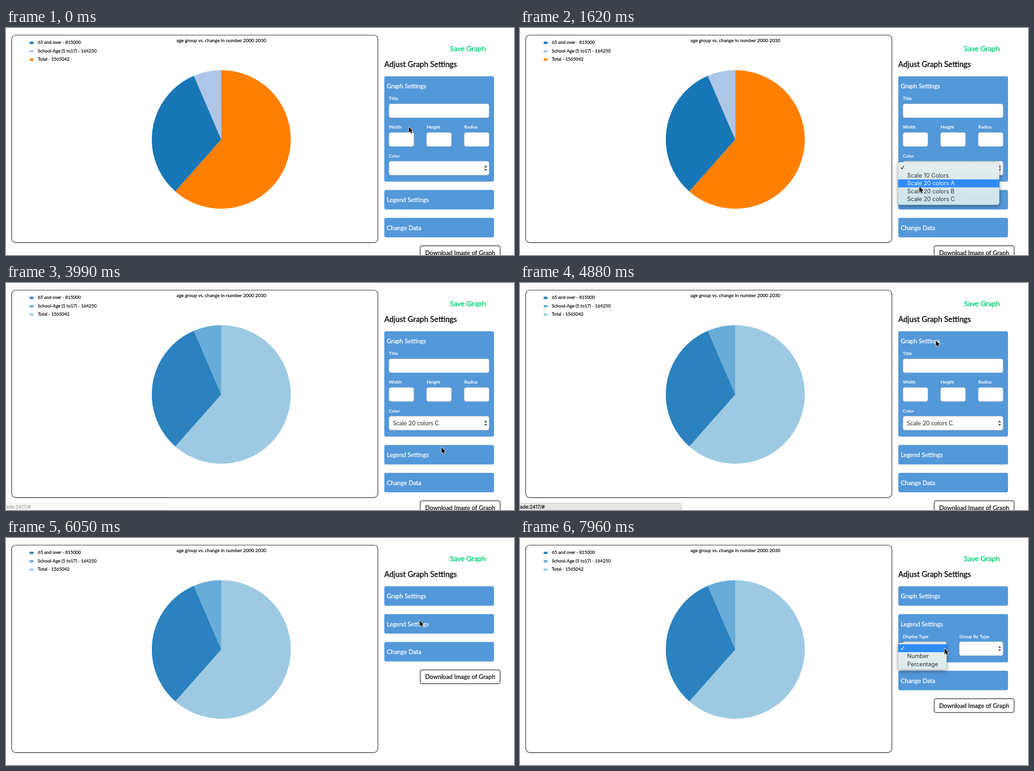
Recreate the animation shown at these times as an HTML page with a canvas. Size 1118 by 501 pixels, loop 8 s.

```html
<!DOCTYPE html>
<html lang="en">
<head>
<meta charset="utf-8">
<title>Graph settings</title>
<style>
html, body { margin: 0; width: 100%; height: 100%; overflow: hidden; background: #fff; }
canvas { display: block; width: 1118px; height: 501px; }
</style>
</head>
<body>
<canvas id="stage"></canvas>
<script>
const W = 1118, H = 501, LOOP = 8000, TICK = 147.4;
const canvas = document.getElementById('stage');
const ctx = canvas.getContext('2d');
const dpr = window.devicePixelRatio || 1;
canvas.width = W * dpr;
canvas.height = H * dpr;

const UI = 'Lato, "Open Sans", sans-serif';
const SYSTEM = 'Inter, Roboto, sans-serif';
const BLUE = '#5398d9';
const HEAD = 43, GAP = 18.5, PANEL_TOP = 106.6;

const DATA = [
  ['65 and over', 815000],
  ['School-Age (5 to17)', 164250],
  ['Total', 1565042]
];
const TOTAL = DATA.reduce((sum, d) => sum + d[1], 0);
const COLORS_A = ['#1776b6', '#aec6e8', '#ff8000'];
const COLORS_C = ['#2b82bf', '#68acd9', '#9dcae2'];
const SCALES = ['', 'Scale 10 Colors', 'Scale 20 colors A', 'Scale 20 colors B', 'Scale 20 colors C'];

// Keyframes: [tick, values...]
const POINTER = [
  [0, 886.5, 218], [3, 871, 316], [6, 871, 316], [11, 879, 350], [12, 879, 357],
  [15, 878.5, 372], [16, 878.5, 372], [17, 878.5, 373.5], [23, 878.5, 373.5],
  [27, 958.5, 363], [32, 915, 127], [35, 915, 126], [36, 927, 143], [37, 927, 146],
  [42, 906, 191], [43, 906, 191], [45, 911.5, 212], [51, 934, 243.5], [54, 934.5, 244]
];
const STATUS = [
  [23, 0], [24, 1], [26, 1], [27, .28], [28, 0], [32, 0], [33, 1], [37, 1], [39, 0],
  [41, 0], [42, 1], [50, 1], [54, 0]
];

function track(keys, k) {
  let i = 0;
  while (i < keys.length - 1 && keys[i + 1][0] <= k) i++;
  const a = keys[i], b = keys[i + 1];
  if (!b || k <= a[0]) return a.slice(1);
  const p = (k - a[0]) / (b[0] - a[0]);
  return a.slice(1).map((v, n) => v + (b[n + 1] - v) * p);
}

// cubic-bezier(.25, .1, .25, 1)
function ease(x) {
  if (x <= 0) return 0;
  if (x >= 1) return 1;
  const curve = (a, b, s) => 3 * a * s * (1 - s) ** 2 + 3 * b * s * s * (1 - s) + s ** 3;
  let lo = 0, hi = 1;
  for (let i = 0; i < 20; i++) {
    const mid = (lo + hi) / 2;
    if (curve(.25, .25, mid) < x) lo = mid; else hi = mid;
  }
  return curve(.1, 1, lo);
}

// A thin outline of the given thickness thickens the regular face.
function text(str, x, y, size, color, { weight = 400, family = UI, align = 'left', bolder = .3 } = {}) {
  ctx.font = `${weight} ${size}px ${family}`;
  ctx.textAlign = align;
  ctx.fillStyle = ctx.strokeStyle = color;
  ctx.lineJoin = 'round';
  ctx.lineWidth = bolder;
  ctx.fillText(str, x, y);
  if (bolder) ctx.strokeText(str, x, y);
}

function box(x, y, w, h, r, fill, stroke, line = 1) {
  ctx.beginPath();
  ctx.roundRect(x, y, w, h, r);
  if (fill) { ctx.fillStyle = fill; ctx.fill(); }
  if (stroke) { ctx.strokeStyle = stroke; ctx.lineWidth = line; ctx.stroke(); }
}

function poly(points, fill) {
  ctx.beginPath();
  points.forEach(([x, y]) => ctx.lineTo(x, y));
  ctx.closePath();
  ctx.fillStyle = fill;
  ctx.fill();
}

function drawGraph(colors) {
  box(12.5, 15.8, 806, 457.8, 9, '#fff', '#111', 1.1);
  text('age group vs. change in number 2000 2030', 474, 30.5, 10.4, '#111', { align: 'center' });
  DATA.forEach(([name, value], i) => {
    const y = 35 + i * 18.5;
    ctx.fillStyle = colors[i];
    ctx.fillRect(52, y - 4.7, 8.5, 5);
    text(`${name} - ${value}`, 70, y, 9.9, '#111');
  });
  let start = -Math.PI / 2;
  [2, 0, 1].forEach(i => {
    const end = start + DATA[i][1] / TOTAL * Math.PI * 2;
    ctx.beginPath();
    ctx.moveTo(473.8, 246);
    ctx.arc(473.8, 246, 153, start, end);
    ctx.closePath();
    ctx.fillStyle = colors[i];
    ctx.fill();
    start = end;
  });
}

function field(x, y, w) {
  box(x, y, w, 30.5, 4, '#fff', '#c4c9ce');
}

function select(x, y, w, value = '') {
  field(x, y, w);
  const ax = x + w - 7.3, ay = y + 15.2;
  for (const dir of [-1, 1]) {
    poly([[ax - 3, ay + dir * 1.6], [ax + 3, ay + dir * 1.6], [ax, ay + dir * 6.2]], '#4c4c4c');
  }
  if (value) text(value, x + 8.5, y + 20, 13.5, '#555');
}

function label(str, x, y) {
  text(str, x, y, 10, '#fff', { weight: 700, bolder: 0 });
}

// Draws a panel clipped to its height; returns the top of the next one.
function panel(title, y, extra, content) {
  const h = HEAD + extra;
  ctx.save();
  box(832.5, y, 241.5, h, 4, BLUE);
  ctx.clip();
  text(title, 838, y + 26.5, 13.4, '#fff');
  if (extra > 0) content(y);
  ctx.restore();
  return y + h + GAP;
}

function graphFields(choice) {
  return y => {
    label('Title', 842.5, y + 52.5);
    field(843, y + 60.8, 220);
    ['Width', 'Height', 'Radius'].forEach((name, i) => {
      label(name, 842.5 + i * 83, y + 115.8);
      field(843 + i * 82.8, y + 124.2, 54.5);
    });
    label('Color', 842.5, y + 179.2);
    select(843, y + 187.5, 220, choice);
  };
}

function legendFields(y) {
  label('Display Type', 842.5, y + 52.5);
  select(843, y + 60.8, 95.5);
  label('Group By Type', 967, y + 52.5);
  select(967, y + 60.8, 96);
}

function drawSidebar(graphOpen, legendOpen, choice) {
  text('Save Graph', 977, 50.8, 15.8, '#00d478', { bolder: .5 });
  text('Adjust Graph Settings', 832.5, 85.5, 16.8, '#111', { bolder: .5 });
  let y = panel('Graph Settings', PANEL_TOP, 189.5 * graphOpen, graphFields(choice));
  y = panel('Legend Settings', y, 63.5 * legendOpen, legendFields);
  y = panel('Change Data', y, 0);
  box(911.5, y, 176, 30.5, 4, '#fff', '#111', 1.2);
  text('Download Image of Graph', 999.5, y + 20.3, 13.4, '#111', { align: 'center' });
}

function drawMenu(y, w, items, active, alpha = 1) {
  const x = 832, row = 17.5, h = items.length * row + 7;
  const tint = ctx.createLinearGradient(0, y, 0, y + h);
  tint.addColorStop(0, '#e7efec');
  tint.addColorStop(1, items.length > 3 ? '#cbe4ec' : '#dcebec');
  ctx.save();
  ctx.globalAlpha = alpha;
  ctx.shadowColor = 'rgba(0,0,0,.4)';
  ctx.shadowBlur = 10 * dpr;
  ctx.shadowOffsetY = 3 * dpr;
  box(x, y, w, h, 5, tint);
  ctx.shadowColor = 'transparent';
  box(x, y, w, h, 5, null, 'rgba(90,110,120,.35)', .7);
  items.forEach((item, i) => {
    const top = y + 3.2 + i * row;
    const color = i === active ? '#fff' : '#2c3336';
    if (i === active) {
      ctx.fillStyle = '#2f8bfb';
      ctx.fillRect(x, top, w, row);
    }
    text(item, x + 20, top + 13.2, 12.6, color, { family: SYSTEM, bolder: 0 });
    if (i === 0) {
      ctx.beginPath();
      ctx.moveTo(x + 6.5, top + 9);
      ctx.lineTo(x + 8.8, top + 12);
      ctx.lineTo(x + 13, top + 4.5);
      ctx.strokeStyle = color;
      ctx.lineWidth = 1.5;
      ctx.stroke();
    }
  });
  ctx.restore();
}

function drawStatus(alpha) {
  if (alpha <= 0) return;
  ctx.save();
  ctx.globalAlpha = alpha;
  box(-5, 486.3, 359.5, 20, 3, '#e8e8e8', '#b4b4b4');
  text('ade:2417/#', 0, 497.5, 10.4, '#111', { family: SYSTEM });
  ctx.restore();
}

function drawPointer([x, y]) {
  const arrow = [[0, 0], [0, 14.4], [3.3, 11.4], [5.5, 16.4], [7.9, 15.4], [5.8, 10.5], [10.2, 10.3]];
  ctx.save();
  ctx.translate(x, y);
  ctx.scale(.88, .88);
  ctx.shadowColor = 'rgba(0,0,0,.3)';
  ctx.shadowBlur = 2 * dpr;
  ctx.shadowOffsetY = dpr;
  poly(arrow, '#000');
  ctx.shadowColor = 'transparent';
  ctx.strokeStyle = '#fff';
  ctx.lineWidth = 2;
  ctx.stroke();
  poly(arrow, '#000');
  ctx.restore();
}

function highlight(k) {
  return k < 7 ? 0 : k < 9 ? 1 : k < 12 ? 2 : k < 14 ? 3 : 4;
}

function draw(time) {
  const k = Math.floor((time + 8) / TICK), t = k * TICK;
  const chosen = k >= 22;
  ctx.setTransform(dpr, 0, 0, dpr, 0, 0);
  ctx.fillStyle = '#fff';
  ctx.fillRect(0, 0, W, H);
  drawGraph(chosen ? COLORS_C : COLORS_A);
  drawSidebar(1 - ease((t - 5089) / 350), ease((t - 6363) / 350), chosen ? SCALES[4] : '');
  if (k >= 5 && k < 21) drawMenu(296, 223, SCALES, highlight(k), k === 20 ? .5 : 1);
  if (k >= 53) drawMenu(231.3, 107, ['', 'Number', 'Percentage'], 0);
  drawStatus(track(STATUS, k)[0]);
  drawPointer(track(POINTER, k));
}

function loop() {
  draw(performance.now() % LOOP);
  requestAnimationFrame(loop);
}
loop();
</script>
</body>
</html>
```
